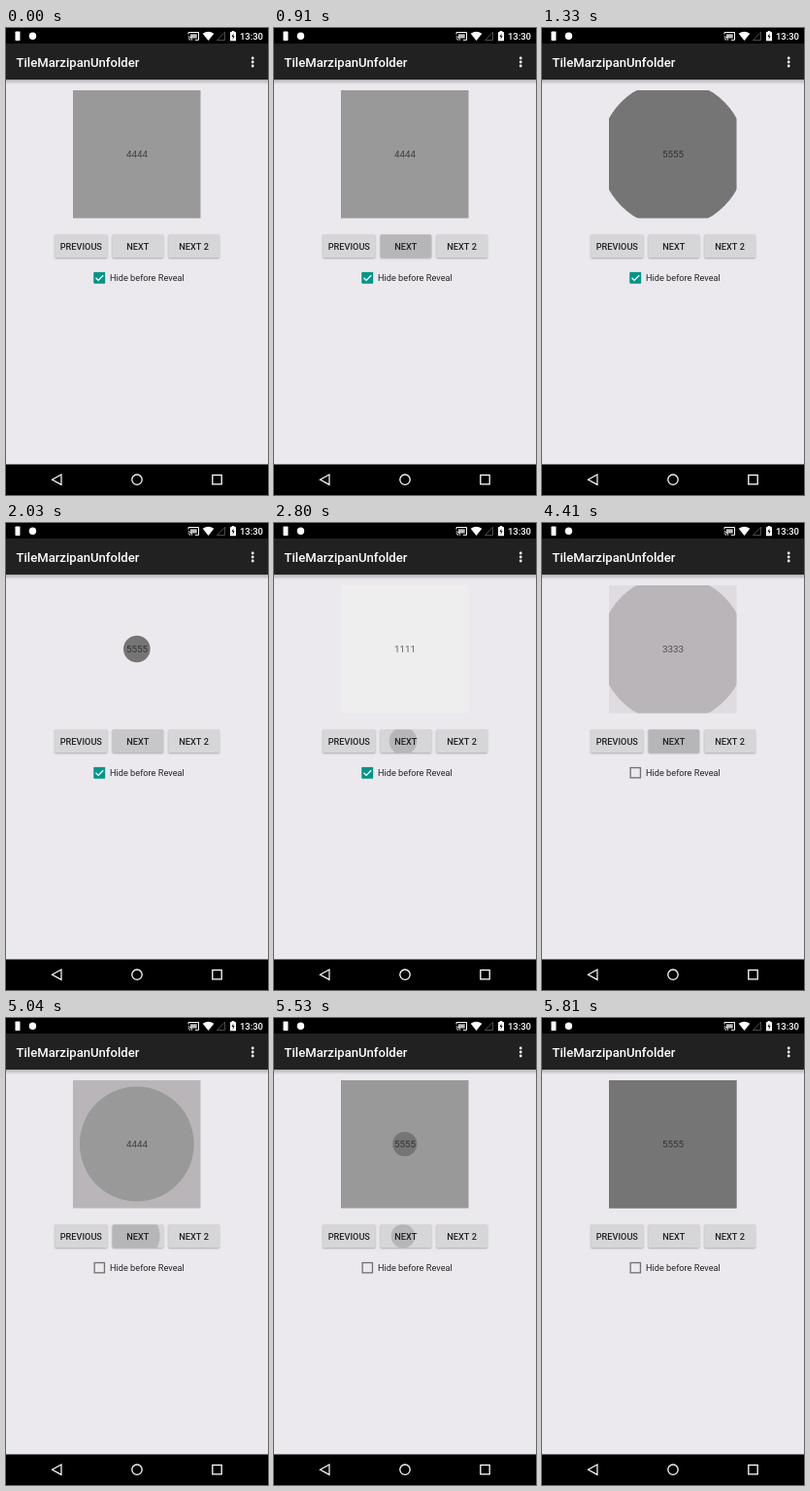
An HTML page with a canvas that plays this animation: 270 px wide and 480 px high, repeating every 5.95 s.

```html
<!DOCTYPE html>
<html lang="en">
<head>
<meta charset="utf-8">
<title>Card reveal</title>
<style>
  html, body { margin: 0; width: 100%; height: 100%; overflow: hidden; background: #ebe9ee; }
  canvas { display: block; width: 270px; height: 480px; }
</style>
</head>
<body>
<canvas id="stage"></canvas>
<script>
const canvas = document.getElementById('stage');
const ctx = canvas.getContext('2d');
const ratio = window.devicePixelRatio || 1;
canvas.width = 270 * ratio;
canvas.height = 480 * ratio;
ctx.scale(ratio, ratio);

const LOOP = 5950, STEP = 70, REVEAL = 300;
const BACKGROUND = '#ebe9ee';
const CARD = { x: 69, y: 64, size: 131.5 };
const CENTER = { x: 134.8, y: 129.5 };
const CARD_COLORS = ['#efeeef', '#e0dbe0', '#b9b5b9', '#999999', '#757575'];
const UNCHECK_TIME = 3700;
const BUTTONS = [
  { label: 'PREVIOUS', x: 50.2, width: 54.2 },
  { label: 'NEXT', x: 109.5, width: 52.7 },
  { label: 'NEXT 2', x: 167.3, width: 52.7 }
];
// Each tap on NEXT: finger down, click, and the card it brings in
const TAPS = [
  { press: 690, click: 866, card: 4 },
  { press: 1745, click: 1793, card: 0 },
  { press: 2725, click: 2780, card: 1 },
  { press: 4190, click: 4246, card: 2 },
  { press: 4905, click: 4900, card: 3 },
  { press: 5465, click: 5470, card: 4 }
];

const progress = (t, start, duration) => Math.min(1, Math.max(0, (t - start) / duration));
const ease = p => (1 - Math.cos(Math.PI * p)) / 2;
const mix = (a, b, p) => a + (b - a) * p;

function rect(x, y, w, h, color, radius = 0) {
  ctx.fillStyle = color;
  ctx.beginPath();
  ctx.roundRect(x, y, w, h, radius);
  ctx.fill();
}

function circle(x, y, r, color) {
  ctx.fillStyle = color;
  ctx.beginPath();
  ctx.arc(x, y, r, 0, 7);
  ctx.fill();
}

function path(points, closed) {
  ctx.beginPath();
  points.forEach(([x, y]) => ctx.lineTo(x, y));
  if (closed) ctx.closePath();
}

function stroke(color, width) {
  ctx.strokeStyle = color;
  ctx.lineWidth = width;
  ctx.stroke();
}

function text(label, x, y, size, color, weight = 400, align = 'left') {
  ctx.font = `${weight} ${size}px Roboto, sans-serif`;
  ctx.textAlign = align;
  ctx.fillStyle = color;
  ctx.fillText(label, x, y);
}

function drawStatusBar() {
  rect(0, 0, 270, 16, '#000');
  rect(9.5, 3.5, 5, 9.5, '#fff', 0.8);
  circle(27.5, 8.2, 3.7, '#fff');

  // Cast
  path([[188, 6.5], [188, 4.5], [198.5, 4.5], [198.5, 12.3], [195, 12.3]]);
  stroke('#fff', 1);
  rect(190, 6.3, 6.7, 4.2, '#bbb');
  for (const r of [2, 4]) {
    ctx.beginPath();
    ctx.arc(187.7, 12.7, r, -Math.PI / 2, 0);
    stroke('#fff', 0.9);
  }
  // Wi-Fi
  ctx.beginPath();
  ctx.moveTo(208.5, 13);
  ctx.lineTo(202.7, 5.8);
  ctx.quadraticCurveTo(208.5, 1.5, 214.3, 5.8);
  ctx.fillStyle = '#fff';
  ctx.fill();
  // Signal
  path([[217.5, 12.5], [225.5, 12.5], [225.5, 4.2]], true);
  stroke('#555', 0.9);
  // Battery
  rect(231, 4, 6, 9.3, '#fff', 0.6);
  rect(232.7, 3, 2.6, 1.5, '#fff');
  path([[234.5, 5.5], [232.5, 9], [234, 9], [233.5, 12], [235.6, 8.2], [234.2, 8.2]], true);
  ctx.fillStyle = '#000';
  ctx.fill();

  text('13:30', 265, 12, 9.5, '#fff', 500, 'right');
}

function drawAppBar() {
  const shadow = ctx.createLinearGradient(0, 53, 0, 58);
  shadow.addColorStop(0, 'rgba(0,0,0,.25)');
  shadow.addColorStop(1, 'rgba(0,0,0,0)');
  rect(0, 53, 270, 5, shadow);
  rect(0, 16, 270, 37, '#212121');
  text('TileMarzipanUnfolder', 10.5, 39.7, 13.1, '#fff', 500);
  for (const y of [31, 35, 39]) circle(254.2, y, 1.4, '#fff');
}

function drawNavigationBar() {
  rect(0, 448.5, 270, 31.5, '#000');
  path([[47.5, 464.2], [57, 459], [57, 469.4]], true);
  stroke('#fff', 1.2);
  ctx.beginPath();
  ctx.arc(135, 464.2, 5.2, 0, 7);
  stroke('#fff', 1.3);
  ctx.strokeRect(212.8, 459.5, 9.4, 9.4);
}

function drawCard(index, radius) {
  ctx.save();
  if (radius !== undefined) {
    ctx.beginPath();
    ctx.arc(CENTER.x, CENTER.y, radius, 0, 7);
    ctx.clip();
  }
  rect(CARD.x, CARD.y, CARD.size, CARD.size, CARD_COLORS[index]);
  text(String(index + 1).repeat(4), 135, 133, 9.8, 'rgba(0,0,0,.58)', 400, 'center');
  ctx.restore();
}

function drawCards(t) {
  const done = TAPS.filter(tap => tap.click <= t);
  const tap = done.at(-1);
  const before = done.length > 1 ? done.at(-2).card : 3;
  if (!tap) return drawCard(before);

  const hidesFirst = tap.click < UNCHECK_TIME;
  const start = tap.click + (hidesFirst ? REVEAL : 0);
  if (!hidesFirst) {
    drawCard(before);
  } else if (t < start) {
    return drawCard(before, CARD.size * (1 - ease(progress(t, tap.click, REVEAL))));
  }
  drawCard(tap.card, CARD.size * ease(progress(t, start, REVEAL)));
}

function drawButtons(t) {
  for (const { label, x, width } of BUTTONS) {
    ctx.save();
    ctx.shadowColor = 'rgba(0,0,0,.28)';
    ctx.shadowBlur = 2 * ratio;
    ctx.shadowOffsetY = 0.8 * ratio;
    rect(x, 212.3, width, 23.8, '#d6d6d8', 1.4);
    ctx.restore();

    if (label === 'NEXT') {
      ctx.save();
      ctx.beginPath();
      ctx.roundRect(x, 212.3, width, 23.8, 1.4);
      ctx.clip();
      for (const { press, click } of TAPS) {
        const alpha = 0.15 * (1 - progress(t, click + 165, 135));
        if (t >= press && alpha > 0) {
          circle(133, 224.2, Math.min(42, (t - press) * 0.19), `rgba(0,0,0,${alpha})`);
        }
      }
      ctx.restore();
    }
    text(label, x + width / 2, 227.6, 9.2, '#222', 500, 'center');
  }
}

function drawCheckbox(t) {
  const off = progress(t, UNCHECK_TIME, 200);
  const alpha = 0.1 * (1 - progress(t, 3800, 180));
  if (t >= 3635 && alpha > 0) {
    circle(96.3, 256.7, 14 * progress(t, 3600, 150), `rgba(0,0,0,${alpha})`);
  }
  // The solid box empties from its middle until only the outline is left
  const line = mix(5.8, 1.3, off);
  const color = `rgb(${mix(0, 112, off)},${mix(150, 112, off)},${mix(136, 112, off)})`;
  ctx.strokeStyle = color;
  ctx.lineWidth = line;
  ctx.strokeRect(90.5 + line / 2, 250.9 + line / 2, 11.6 - line, 11.6 - line);
  if (off === 0) {
    rect(90.5, 250.9, 11.6, 11.6, color, 1);
    path([[92.5, 256.8], [95.1, 259.4], [100.2, 254.2]]);
    stroke('#fff', 1.3);
  }
  text('Hide before Reveal', 107, 260.2, 9.2, '#222');
}

function draw(now) {
  const t = Math.floor((now % LOOP) / STEP) * STEP;
  rect(0, 0, 270, 480, BACKGROUND);
  drawStatusBar();
  drawAppBar();
  drawCards(t);
  drawButtons(t);
  drawCheckbox(t);
  drawNavigationBar();
}

let start;
function tick(now) {
  start ??= now;
  draw(Math.max(0, now - start));
  requestAnimationFrame(tick);
}
draw(0);
requestAnimationFrame(tick);
</script>
</body>
</html>
```
